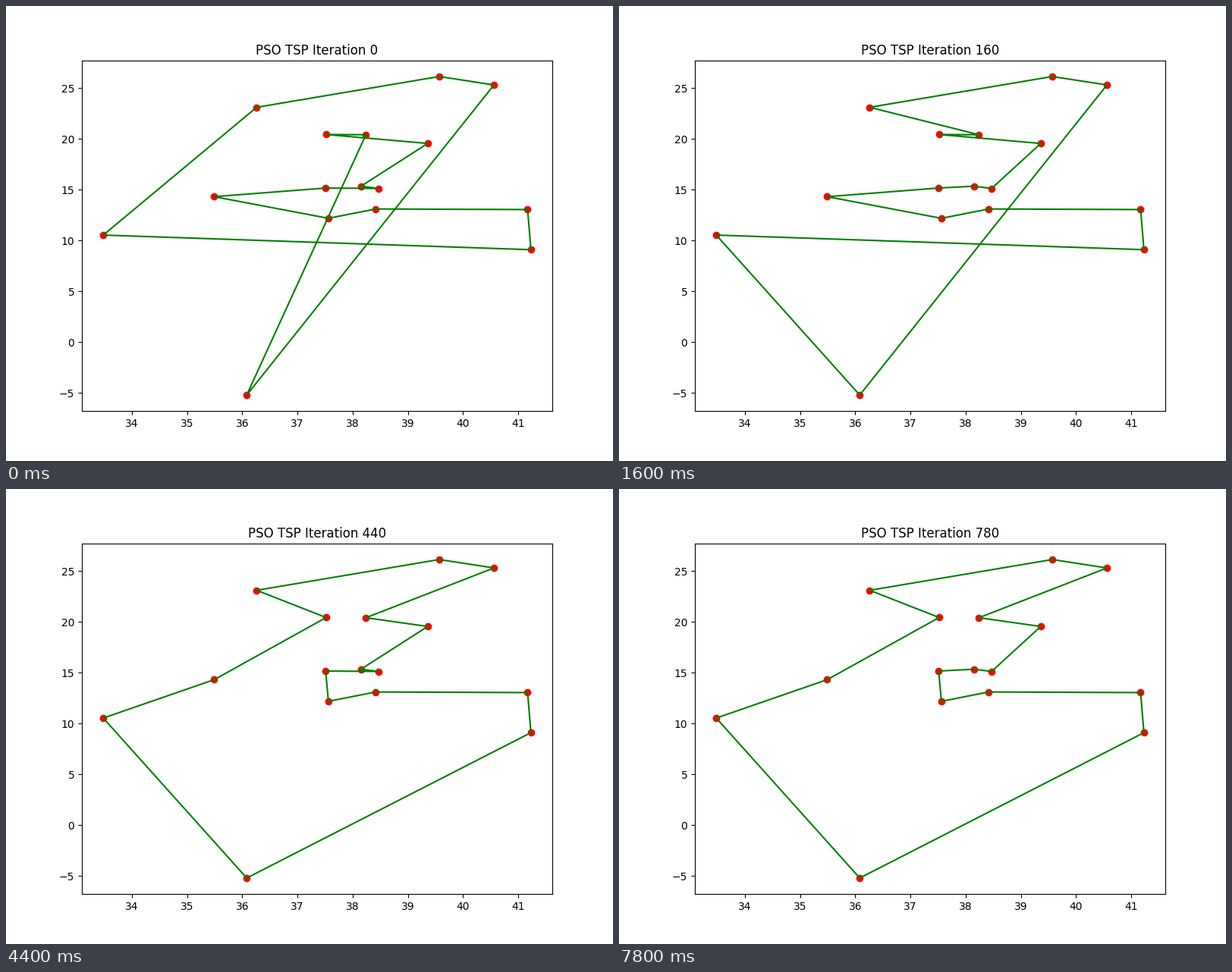
These frames come from a looping animation (800 by 600 pixels, 8 s). A matplotlib script:

```python
import numpy as np
import matplotlib.pyplot as plt
from matplotlib.animation import FuncAnimation

STEP = 20        # iterations per frame
FRAMES = 40
INTERVAL = 200   # ms

# ulysses16 data set, cities numbered from 1
CITIES = np.array([
    (38.24, 20.42), (39.57, 26.15), (40.56, 25.32), (36.26, 23.12),
    (33.48, 10.54), (37.56, 12.19), (38.42, 13.11), (37.52, 20.44),
    (41.23, 9.10), (41.17, 13.05), (36.08, -5.21), (38.47, 15.13),
    (38.15, 15.35), (37.51, 15.17), (35.49, 14.32), (39.36, 19.56),
])

# Iteration of each improvement and the stretches of the tour it reverses
FLIPS = {
    40: [(4, 11), (8, 16), (13, 12), (13, 7), (7, 6), (14, 13)],
    100: [(16, 8), (6, 7), (13, 14), (7, 13)],
    180: [(16, 11), (11, 5)],
    420: [(5, 15), (6, 5), (3, 1), (4, 3), (13, 12)],
    520: [(12, 13)],
}


def nearest_neighbour(start=1):
    tour = [start]
    left = set(range(1, len(CITIES) + 1)) - {start}
    while left:
        here = CITIES[tour[-1] - 1]
        tour.append(min(left, key=lambda c: np.hypot(*(CITIES[c - 1] - here))))
        left.remove(tour[-1])
    return tour


def rotate(tour, first):
    i = tour.index(first)
    return tour[i:] + tour[:i]


def flip(tour, first, last):
    """Reverse the stretch of the closed tour from first to last."""
    tour = rotate(tour, first)
    n = tour.index(last) + 1
    return tour[:n][::-1] + tour[n:]


def best_tour(iteration):
    tour = nearest_neighbour()
    for found, flips in FLIPS.items():
        if found <= iteration:
            for first, last in flips:
                tour = flip(tour, first, last)
    tour = rotate(tour, 1)
    return CITIES[np.array(tour + tour[:1]) - 1]


fig, ax = plt.subplots(figsize=(8, 6), dpi=100)
ax.scatter(*CITIES.T, color="red")
line, = ax.plot(*best_tour(0).T, color="green")
title = ax.set_title("PSO TSP Iteration 0")


def update(frame):
    iteration = frame * STEP
    line.set_data(*best_tour(iteration).T)
    title.set_text(f"PSO TSP Iteration {iteration}")
    return line, title


anim = FuncAnimation(fig, update, frames=FRAMES, interval=INTERVAL,
                     repeat=True, repeat_delay=0, blit=False)
plt.show()
```
